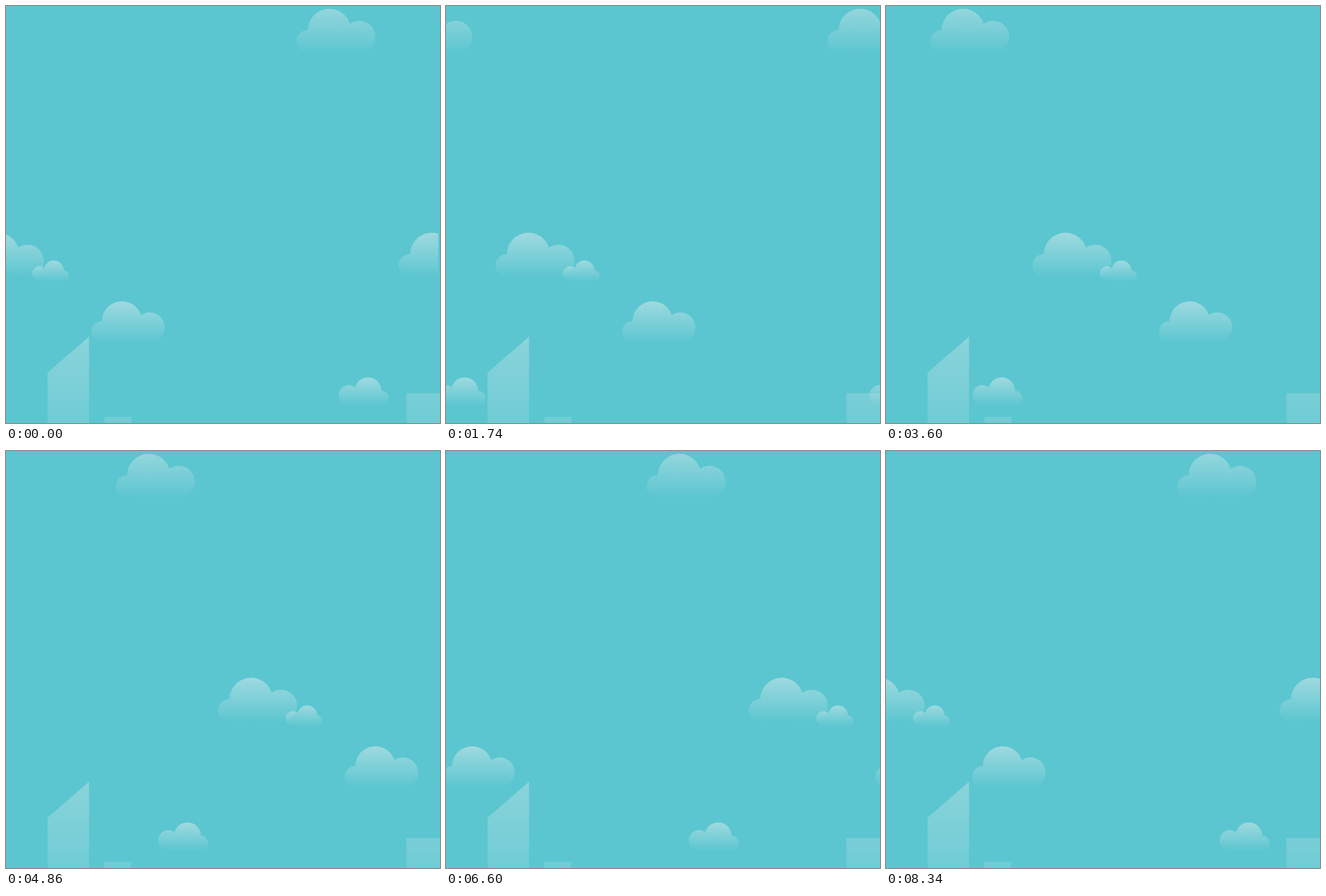
These frames come from a looping animation (763x734 px, 8.4 s). An HTML page with a canvas:

```html
<!DOCTYPE html>
<html lang="en">
<head>
<meta charset="utf-8">
<title>Drifting clouds</title>
<style>
  html, body { margin: 0; width: 100%; height: 100%; overflow: hidden; background: #5bc6d0; }
  canvas { display: block; }
</style>
</head>
<body>
<canvas id="sky" width="763" height="734"></canvas>
<script>
const W = 763, H = 734, LOOP = 8400, STEP = 60, SPEED = 5.5;
const ctx = document.getElementById('sky').getContext('2d');

// Circles are [x, y, radius]; base is [left, top, right, bottom].
const wide = {
  w: 139, h: 79,
  circles: [[58, 38, 38], [20, 57.7, 20], [110.5, 49.7, 28.5]],
  base: [20, 50, 110.5, 78]
};
const small = {
  w: 88, h: 50,
  circles: [[51.5, 23.7, 23.7], [17.5, 31, 17.5], [74.5, 37, 13.5]],
  base: [17.5, 31, 74.5, 50]
};

const clouds = [
  { shape: wide, x: 510.5, y: 4.8, scale: 1, alpha: 0.38 },
  { shape: wide, x: 690.4, y: 399, scale: 1, alpha: 0.46 },
  { shape: small, x: 46, y: 448, scale: 0.739, alpha: 0.46 },
  { shape: wide, x: 150, y: 519.7, scale: 0.928, alpha: 0.46 },
  { shape: small, x: 585, y: 653.8, scale: 1, alpha: 0.46 }
];

const buildings = [
  [[73, 645.5], [146, 582], [146, H], [73, H]],
  [[173, 723], [220, 723], [220, H], [173, H]],
  [[704, 681.5], [W, 681.5], [W, H], [704, H]]
];

const tint = a => `rgba(239,240,241,${a})`;

function fade(y0, y1, a0, a1) {
  const g = ctx.createLinearGradient(0, y0, 0, y1);
  g.addColorStop(0, tint(a0));
  g.addColorStop(1, tint(a1));
  return g;
}

function drawBuildings() {
  ctx.fillStyle = fade(582, H, 0.32, 0.14);
  for (const points of buildings) {
    ctx.beginPath();
    points.forEach(([x, y]) => ctx.lineTo(x, y));
    ctx.fill();
  }
}

function drawCloud({ shape, y, scale, alpha }, x) {
  const [l, t, r, b] = shape.base;
  ctx.save();
  ctx.translate(x, y);
  ctx.scale(scale, scale);
  ctx.beginPath();
  for (const [cx, cy, rad] of shape.circles) {
    ctx.moveTo(cx + rad, cy);
    ctx.arc(cx, cy, rad, 0, Math.PI * 2);
  }
  ctx.rect(l, t, r - l, b - t);
  ctx.fillStyle = fade(0, shape.h, alpha, 0);
  ctx.fill();
  ctx.restore();
}

function draw(time) {
  const shift = Math.floor((time % LOOP) / STEP) * SPEED;
  ctx.fillStyle = '#5bc6d0';
  ctx.fillRect(0, 0, W, H);
  drawBuildings();

  ctx.save();
  // The cloud layer's right edge starts just inside the stage.
  ctx.beginPath();
  ctx.rect(0, 0, 760 + shift, H);
  ctx.clip();
  for (const cloud of clouds) {
    const x = (cloud.x + shift) % W;
    drawCloud(cloud, x);
    if (x + cloud.shape.w * cloud.scale > W) drawCloud(cloud, x - W);
  }
  ctx.restore();
}

const start = performance.now();
function tick() {
  draw(performance.now() - start);
  requestAnimationFrame(tick);
}
tick();
</script>
</body>
</html>
```
